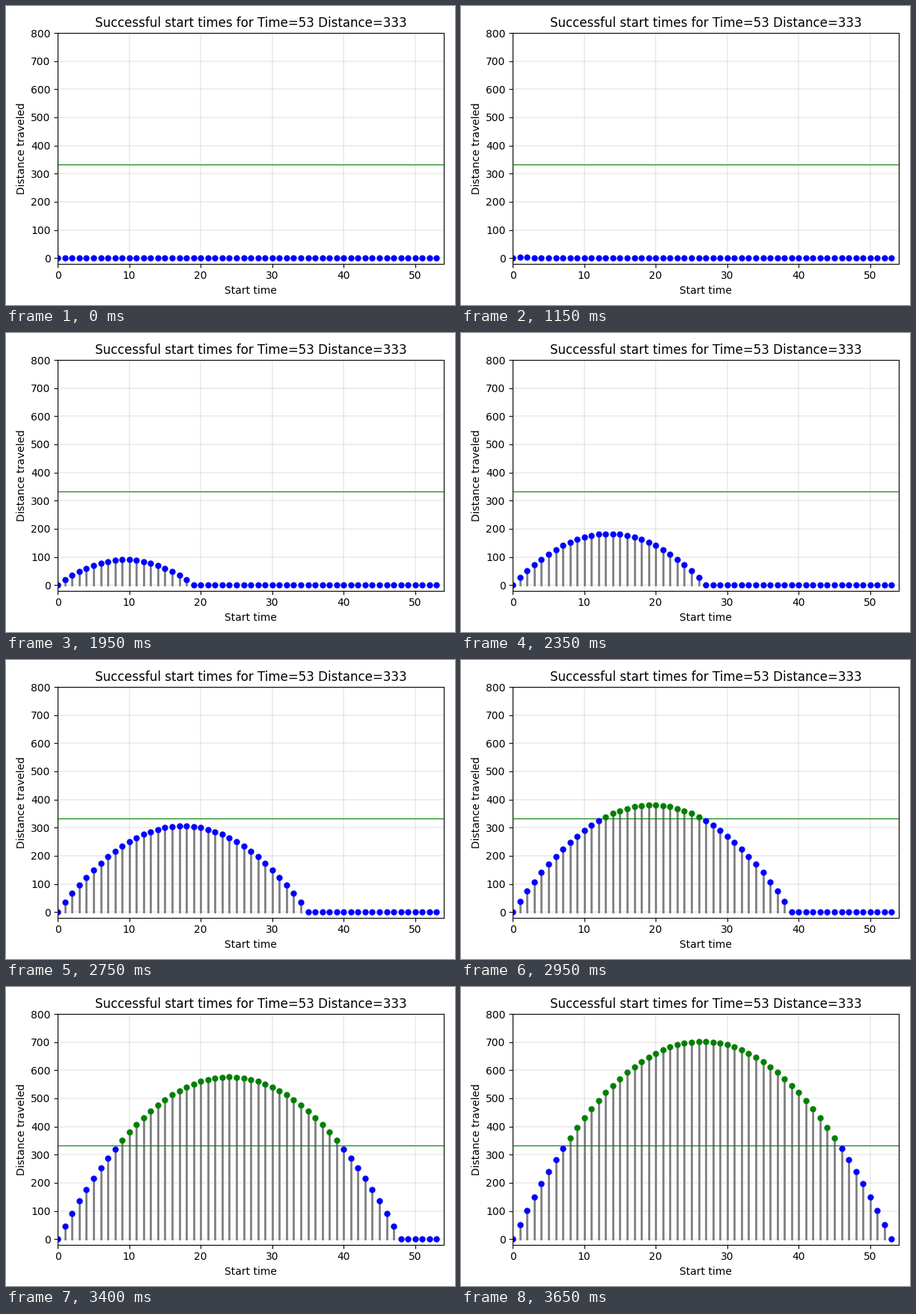
A matplotlib script for the animation above (5.65 s loop, 600 by 400 pixels).

```python
import numpy as np
import matplotlib.pyplot as plt
from matplotlib.animation import FuncAnimation

TIME, RECORD = 53, 333
STEP_MS = 50
LEAD_STEPS = 20      # pause before the race clock starts
FRAMES = 113
WIDTH, HEIGHT, DPI = 600, 400, 100

starts = np.arange(TIME + 1)

fig, ax = plt.subplots(figsize=(WIDTH / DPI, HEIGHT / DPI), dpi=DPI)
fig.subplots_adjust(left=69.2 / WIDTH, right=585 / WIDTH,
                    bottom=1 - 344.73 / HEIGHT, top=1 - 36 / HEIGHT)
ax.set(xlim=(0, TIME + 1), ylim=(-20, 800),
       xlabel="Start time", ylabel="Distance traveled",
       title=f"Successful start times for Time={TIME} Distance={RECORD}")
ax.grid(linewidth=0.3)

# All stems share one line, separated by NaN gaps.
stems, = ax.plot([], [], color="gray", linewidth=2, solid_capstyle="projecting")
ax.axhline(RECORD, color="green", linewidth=0.8)
losing, = ax.plot([], [], "o", color="blue", markersize=5)
winning, = ax.plot([], [], "o", color="green", markersize=5)


def distances(clock):
    return starts * np.maximum(clock - starts, 0)


def update(frame):
    clock = min(max(frame - LEAD_STEPS, 0), TIME)
    reach = distances(clock)
    wins = reach > RECORD
    losing.set_data(starts[~wins], reach[~wins])
    winning.set_data(starts[wins], reach[wins])

    x, y = starts[reach > 0], reach[reach > 0]
    gap = np.full(len(x), np.nan)
    stems.set_data(np.column_stack([x, x, gap]).ravel(),
                   np.column_stack([0 * y, y, gap]).ravel())
    return stems, losing, winning


anim = FuncAnimation(fig, update, frames=FRAMES, interval=STEP_MS,
                     repeat=True, repeat_delay=0, blit=False)
plt.show()
```
